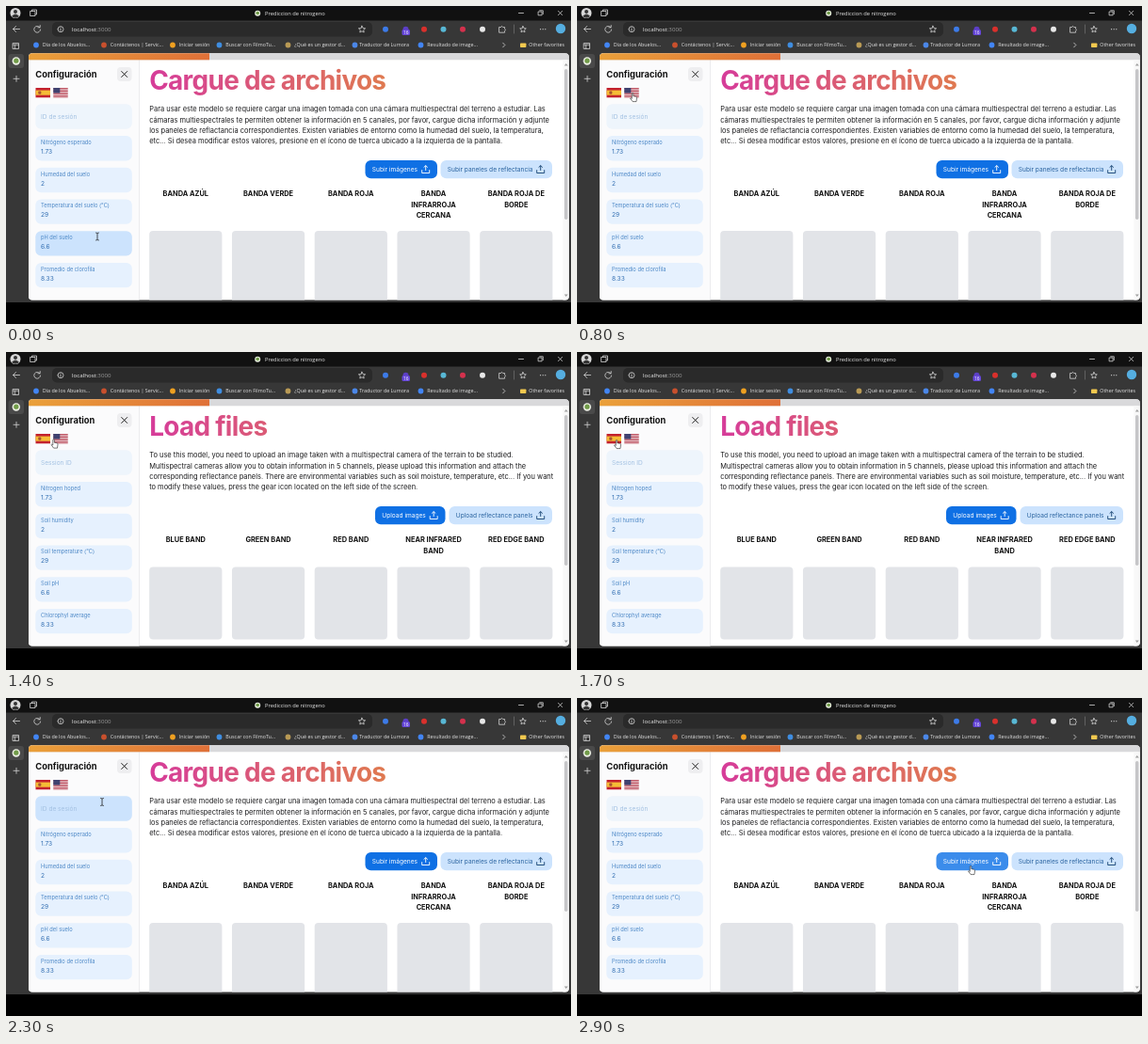
These frames come from a looping animation (600x338 px, 3 s). An HTML page:

```html
<!DOCTYPE html>
<html lang="es">
<head>
<meta charset="utf-8">
<style>
  html, body { margin: 0; width: 100%; height: 100%; overflow: hidden; background: #000; }
  svg { display: block; width: 600px; height: 338px; font-family: Inter, sans-serif; }
  .chrome { font-family: "Open Sans", "Noto Sans", sans-serif; }
  .line { fill: none; stroke: #d4d4d4; stroke-width: .8; stroke-linecap: round; stroke-linejoin: round; }
  .title { font-weight: 700; letter-spacing: -.025em; }
</style>
</head>
<body>
<svg id="stage" viewBox="0 0 600 338"></svg>
<script>
const stage = document.getElementById('stage');

const rect = (x, y, w, h, fill, r = 0, extra = '') =>
  `<rect x="${x}" y="${y}" width="${w}" height="${h}" rx="${r}" fill="${fill}" ${extra}/>`;
const dot = (x, y, r, fill) => `<circle cx="${x}" cy="${y}" r="${r}" fill="${fill}"/>`;
const text = (x, y, size, fill, str, extra = '') =>
  `<text x="${x}" y="${y}" font-size="${size}" fill="${fill}" ${extra}>${str}</text>`;
const line = (d, extra = '') => `<path class="line" d="${d}" ${extra}/>`;
const times = (n, make) => Array.from({ length: n }, (_, i) => make(i)).join('');

const inputY = i => 104.3 + i * 33.72;
const values = ['1.73', '2', '29', '6.6', '8.33'];

const languages = {
  es: {
    heading: 'Configuración', session: 'ID de sesión', title: 'Cargue de archivos',
    labels: ['Nitrógeno esperado', 'Humedad del suelo', 'Temperatura del suelo (°C)', 'pH del suelo', 'Promedio de clorofila'],
    intro: [
      'Para usar este modelo se requiere cargar una imagen tomada con una cámara multiespectral del terreno a estudiar. Las',
      'cámaras multiespectrales te permiten obtener la información en 5 canales, por favor, cargue dicha información y adjunte',
      'los paneles de reflactancia correspondientes. Existen variables de entorno como la humedad del suelo, la temperatura,',
      'etc... Si desea modificar estos valores, presione en el ícono de tuerca ubicado a la izquierda de la pantalla.'],
    buttons: [[381.5, 458, 'Subir imágenes'], [461.5, 580, 'Subir paneles de reflectancia']],
    bands: ['BANDA AZÚL', 'BANDA VERDE', 'BANDA ROJA', 'BANDA|INFRARROJA|CERCANA', 'BANDA ROJA DE|BORDE'],
    panelY: 239
  },
  en: {
    heading: 'Configuration', session: 'Session ID', title: 'Load files',
    labels: ['Nitrogen hoped', 'Soil humidity', 'Soil temperature (°C)', 'Soil pH', 'Chlorophyl average'],
    intro: [
      'To use this model, you need to upload an image taken with a multispectral camera of the terrain to be studied.',
      'Multispectral cameras allow you to obtain information in 5 channels, please upload this information and attach the',
      'corresponding reflectance panels. There are environmental variables such as soil moisture, temperature, etc... If you want',
      'to modify these values, press the gear icon located on the left side of the screen.'],
    buttons: [[392, 466.5, 'Upload images'], [470.5, 580, 'Upload reflectance panels']],
    bands: ['BLUE BAND', 'GREEN BAND', 'RED BAND', 'NEAR INFRARED|BAND', 'RED EDGE BAND'],
    panelY: 228.5
  }
};

function button([left, right, label], i) {
  const ink = i ? '#2a639f' : '#fff';
  return rect(left, 164.1, right - left, 19.2, i ? '#cce3fd' : '#0f70e4', 6, i ? '' : 'class="primary"') +
    text(left + 7.3, 176.1, 6.58, ink, label) +
    `<path d="M0 5v3.3h8V5M4 5.7V.4M1.9 2.4 4 .4l2.1 2" transform="translate(${right - 16.3} 169.2)"
      fill="none" stroke="${i ? '#12406f' : '#fff'}" stroke-width=".9"/>`;
}

function band(label, i, panelY) {
  const x = 152.2 + i * 87.75;
  return label.split('|').map((part, row) =>
    text(x + 38.6, 202.4 + row * 11.2, 7.42, '#111', part, 'font-weight="700" text-anchor="middle"')).join('') +
    rect(x, panelY, 77.2, 77, '#e2e4e8', 4);
}

function page(id) {
  const t = languages[id];
  return `<g id="${id}">` +
    text(31.3, 75.6, 9.35, '#111', t.heading, 'font-weight="700"') +
    text(37, 120, 6.6, '#a3c1e2', t.session) +
    t.labels.map((label, i) => text(37, inputY(i + 1) + 8.9, 5.72, '#4d88c6', label)).join('') +
    text(152.2, 89.4, 27.9, 'url(#sunset)', t.title, 'class="title"') +
    t.intro.map((row, i) => text(152.2, 112.4 + i * 11.25, 7.46, '#1c1c1e', row)).join('') +
    t.buttons.map(button).join('') +
    t.bands.map((label, i) => band(label, i, t.panelY)).join('') + '</g>';
}

function bookmarks() {
  const items = [
    [32, '#4285f4', 'Día de los Abuelos...'], [104, '#c8502d', 'Contáctenos | Servic...'],
    [177, '#f0a020', 'Iniciar sesión'], [226.5, '#3f8de0', 'Buscar con FilmoTu...'],
    [299.5, '#b99a55', '¿Qué es un gestor d...'], [370.5, '#4b87e8', 'Traductor de Lumora'],
    [440.5, '#4285f4', 'Resultado de image...']];
  return items.map(([x, color, label], i) => dot(x, 41.5, 2.9, color) +
    text(x + (i === 5 ? 4.8 : 6.8), 43.4, 5.36, '#e4e4e4', label)).join('') +
    line('M527.7 39.2l2.2 2.3-2.2 2.3') +
    rect(546, 39.5, 6.4, 4.6, '#f3c94f', .8) + text(555.3, 43.4, 5.36, '#e4e4e4', 'Other favorites');
}

function toolbar() {
  const extensions = [[403, '#3d7be8'], [424.5, '#5b3fc4'], [444, '#d9302c'],
    [464.5, '#58b7d4'], [485, '#d4314d'], [506, '#e8e8e8']];
  return '<g class="chrome">' +
    rect(0, 0, 600, 315, '#373737') + rect(0, 0, 600, 15.5, '#111') +
    dot(10, 7.5, 5.5, '#d8d8d8') + dot(10, 6, 2, '#333') +
    '<path d="M6 11q4-5 8 0-4 3.500-8 0z" fill="#333"/>' +
    line('M26 5.500h5v5h-5zM27.500 5.500V4h5v5H31') +
    dot(267.2, 7.8, 3, '#e9efe0') + dot(267.2, 7.5, 1.8, '#6f9a47') +
    text(275, 9.8, 5.75, '#e8e8e8', 'Prediccion de nitrogeno') +
    line('M544.500 7.500h5M565.500 6h3.600v3.800h-3.600zM566.700 4.800h3.600v3.800M586.500 5.400l4.200 4.200m0-4.200-4.200 4.200') +
    line('M14.500 24.500H7.500m3-3-3 3 3 3') +
    line('M35.800 22.600a3.400 3.400 0 1 0 .8 2.400M36.200 20.500v2.300h-2.300') +
    rect(49, 17, 340, 15.5, '#2a2a2a', 5) +
    line('M55 24.700a3 3 0 1 0 6 0a3 3 0 1 0-6 0M58 24.400v1.800M58 23v.1') +
    text(70, 27, 6.15, '#f0f0f0', 'localhost<tspan fill="#9a9a9a">:3000</tspan>') +
    line('M378 21.200l1.100 2.300 2.500.3-1.900 1.700.5 2.500-2.200-1.200-2.200 1.200.5-2.500-1.900-1.700 2.500-.3z') +
    extensions.map(([x, color]) => dot(x, 24.700, 3, color)).join('') +
    rect(420.5, 25, 8.5, 6, '#6546d8', 1.5) + text(424.8, 29.8, 4.8, '#fff', '16', 'text-anchor="middle"') +
    line('M524 22.500h1.700q.7-2.300 1.900 0h2v1.900q2 .8 0 1.900v1.900H524z') +
    line('M539.500 20v9', 'opacity=".35"') +
    line('M549 21.500l1 2.100 2.300.3-1.700 1.600.4 2.300-2-1.100-2 1.100.4-2.300-1.700-1.600 2.300-.3z') +
    times(3, i => dot(567.6 + i * 2.6, 24.7, .6, '#d4d4d4')) +
    dot(589, 24, 5.2, '#55aee0') +
    line('M7.500 39.500h6v6h-6zM7.500 41.200h6M9.400 41.200v4.300') + bookmarks() +
    rect(2.5, 51, 16.5, 15, '#4a4a4a', 3) + dot(10.8, 58.5, 4.2, '#eef1e6') + dot(10.8, 58.2, 2.6, '#719c49') +
    line('M8 77.300h6m-3-3v6') + '</g>';
}

function flags() {
  return rect(31.5, 87, 15.5, 10.3, '#c3222e') + rect(31.5, 89.6, 15.5, 5.1, '#f5bd36') +
    rect(34.3, 90.5, 3, 3.2, '#a9552f', .7) +
    rect(50.3, 87, 15.4, 10.3, '#ecdde1') +
    times(7, i => rect(50.3, 87 + i * 1.58, 15.4, .8, '#b83b4b')) + rect(50.3, 87, 7, 5.5, '#3f4270');
}

stage.innerHTML = `
  <defs>
    <linearGradient id="sunset" gradientUnits="userSpaceOnUse" x1="152" x2="580" y1="0" y2="0">
      <stop stop-color="#d63c9a"/><stop offset="1" stop-color="#e6a51c"/>
    </linearGradient>
    <linearGradient id="bar"><stop stop-color="#eaa03a"/><stop offset="1" stop-color="#df7038"/></linearGradient>
    <clipPath id="view">${rect(24, 50.3, 573.8, 262.3, '#000', 4)}</clipPath>
  </defs>
  ${rect(0, 0, 600, 338, '#000')}${toolbar()}
  <g clip-path="url(#view)">
    ${rect(24, 50, 574, 264, '#fff')}
    ${rect(24, 57, 117, 257, '#fbfbfc')}${rect(141, 57, .7, 257, '#e4e4e7')}
    ${rect(24, 50, 574, 7.3, '#d9d9db')}${rect(24, 50, 192, 7.3, 'url(#bar)')}
    ${rect(118, 65, 15.500, 15, '#eeeef0', 4)}
    ${line('M122.700 69.500l6 6m0-6-6 6', 'style="stroke:#222;stroke-width:1"')}
    ${flags()}
    ${times(6, i => rect(31.3, inputY(i), 102.5, 26.4, '#e6f1fe', 6, 'class="input"'))}
    ${values.map((value, i) => text(37, inputY(i + 1) + 18.9, 6.56, '#2f6cb0', value)).join('')}
    ${page('es')}${page('en')}
    ${rect(591.5, 57.3, 6.5, 257, '#f8f8f8')}${rect(593, 67, 3.4, 160, '#c6c6c8', 1.7)}
    <path d="M592.800 63.500l2-2.600 2 2.600zM592.800 306.500l2 2.600 2-2.600z" fill="#a0a0a0"/>
  </g>
  <g id="cursor">
    <path id="beam" d="M-1.800-4q1.800 0 1.800.8 0-.8 1.800-.8M0-3.400v6.800M-1.800 4q1.800 0 1.800-.8 0 .8 1.800.8"
      fill="none" stroke="#222" stroke-width=".8"/>
    <path id="hand" d="M-1.700-4.200q.8-.8 1.500 0v2.900l2.900.6q1 .4.800 1.400L3 4.600h-3.900l-2.600-3.500q.2-1 1.800.3z"
      fill="#fff" stroke="#222" stroke-width=".6" stroke-linejoin="round"/>
    <path id="arrow" d="M0 0v7.800l1.800-1.600 1.200 2.600 1.200-.6L3 5.700h2.400z" fill="#fff" stroke="#222" stroke-width=".5"/>
  </g>`;

const byId = id => document.getElementById(id);
const inputs = [...document.querySelectorAll('.input')];
const primary = document.querySelector('#es .primary');
const show = (id, on) => byId(id).setAttribute('display', on ? 'inline' : 'none');

// time, x, y
const route = [[0, 97, 245], [600, 60, 97], [1200, 60, 97], [1600, 43, 98], [1800, 43, 98],
  [2000, 38, 97], [2200, 38, 97], [2500, 285, 149], [2800, 419, 183], [3000, 419, 183]];

function pointerAt(t) {
  const i = route.findIndex(stop => stop[0] > t);
  const [t0, x0, y0] = route[i - 1], [t1, x1, y1] = route[i];
  const u = (t - t0) / (t1 - t0), k = u * u * (3 - 2 * u);
  return [x0 + (x1 - x0) * k, y0 + (y1 - y0) * k];
}

function draw(now) {
  const t = Math.floor(now % 3000 / 100) * 100;
  const [x, y] = pointerAt(t);
  const inside = (l, top, r, b) => x >= l && x <= r && y >= top && y <= b;
  const english = t >= 1000 && t < 2200;
  show('en', english);
  show('es', !english);

  let overInput = false;
  inputs.forEach((el, i) => {
    const over = inside(31, inputY(i), 134, inputY(i) + 26.4);
    overInput ||= over;
    el.setAttribute('fill', over ? '#cce3fd' : i ? '#e6f1fe' : '#eef5fc');
  });
  const overButton = inside(381, 164, 458, 184);
  primary.setAttribute('fill', overButton ? '#3b8ceb' : '#0f70e4');

  const beam = overInput || inside(152, 105, 580, 150);
  const hand = overButton || inside(31, 87, 66, 100);
  show('beam', beam);
  show('hand', hand);
  show('arrow', !beam && !hand);
  byId('cursor').setAttribute('transform', `translate(${x} ${y})`);
}

const start = performance.now();
(function tick() {
  draw(performance.now() - start);
  requestAnimationFrame(tick);
})();
</script>
</body>
</html>
```
